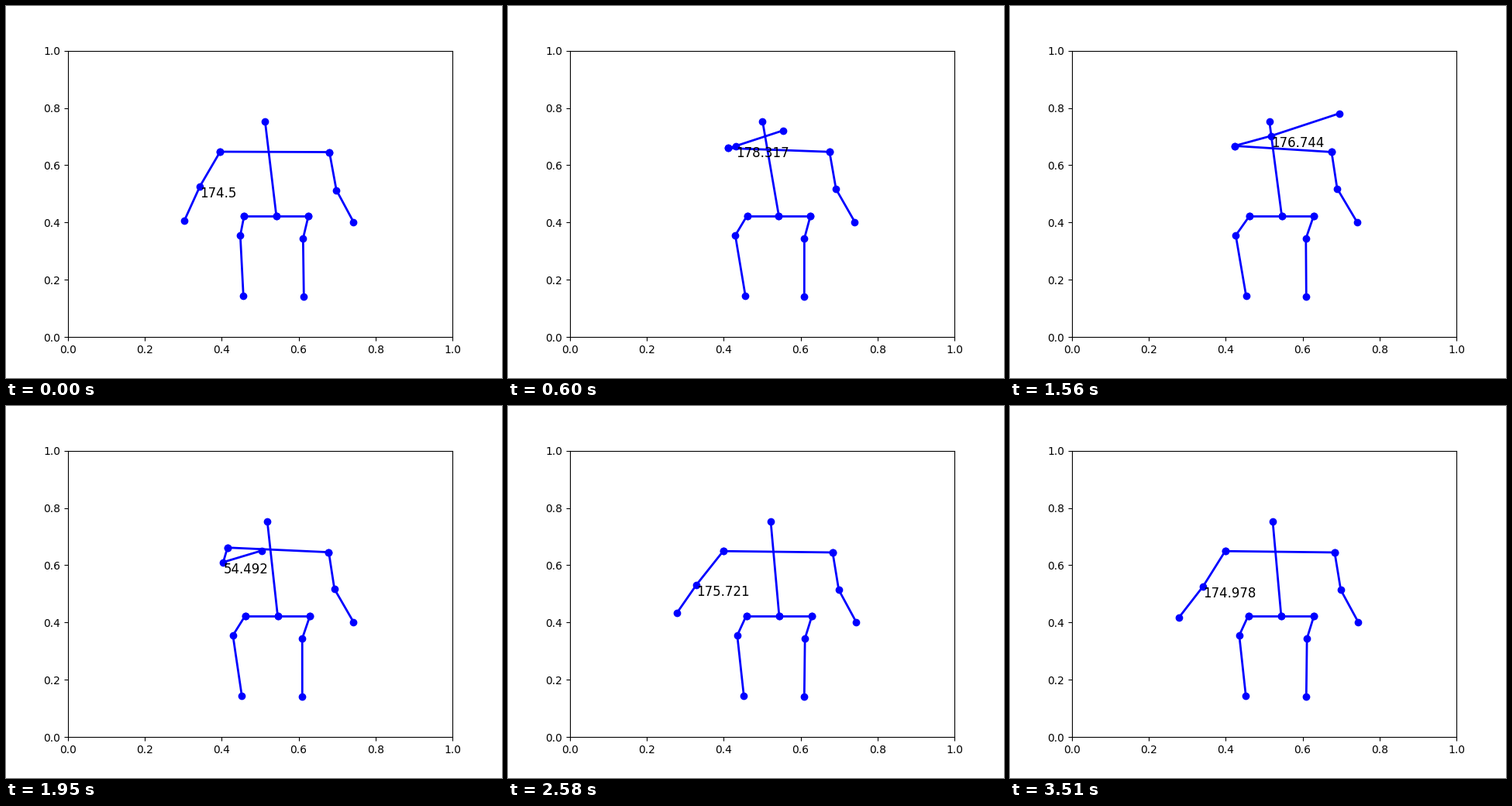
A matplotlib script that plays this animation: 640 px wide and 480 px high, repeating every 3540 ms.

```python
import numpy as np
import matplotlib.pyplot as plt
from matplotlib.animation import FuncAnimation

FRAMES, STEP = 118, 30

# Key poses of the moving arm: time in ms, elbow x y, wrist x y, angle shown.
# Positions are stage pixels, y downwards.
ARM = np.array([
    (0, 250, 233, 230, 277, 174.5),
    (390, 270, 208, 315, 205, 65.7),
    (600, 294, 181, 355, 161, 178.317),
    (990, 347, 161, 427, 131, 178.295),
    (1560, 337, 168, 425, 139, 176.744),
    (1950, 280, 202, 330, 187, 54.492),
    (2160, 256, 224, 254, 251, 157.6),
    (2580, 243, 231, 218, 267, 175.721),
    (3510, 249, 233, 218, 273, 174.978),
])


def key_slopes(times, values):
    """Harmonic mean slopes, so the curve never overshoots a key."""
    rise = np.diff(values, axis=0) / np.diff(times)[:, None]
    a, b = rise[:-1], rise[1:]
    same_way = a * b > 0
    slopes = np.zeros_like(values)
    slopes[1:-1] = np.where(same_way, 2 * a * b / np.where(same_way, a + b, 1), 0)
    return slopes


TIMES, POSES = ARM[:, 0], ARM[:, 1:]
SLOPES = key_slopes(TIMES, POSES)


def arm_pose(t):
    i = min(np.searchsorted(TIMES, t, side="right"), len(TIMES) - 1) - 1
    h = TIMES[i + 1] - TIMES[i]
    u = (t - TIMES[i]) / h
    return ((1 + 2 * u) * (1 - u) ** 2 * POSES[i]
            + u * (1 - u) ** 2 * h * SLOPES[i]
            + u * u * (3 - 2 * u) * POSES[i + 1]
            + u * u * (u - 1) * h * SLOPES[i + 1])


def ease(t, start, end):
    u = min(max((t - start) / (end - start), 0), 1)
    return u * u * (3 - 2 * u)


def pose(t):
    """Joint positions in pixels and the elbow angle in degrees."""
    lift = ease(t, 0, 1050) - 0.9 * ease(t, 1560, 2580)
    lean = ease(t, 0, 500)
    settle = ease(t, 900, 1800)
    elbow_x, elbow_y, wrist_x, wrist_y, angle = arm_pose(t)
    hip_y = 271
    l_hip_x = 307 + 2 * lift
    r_hip_x = 390 + 2 * settle
    joints = {
        "head": (334 - 4 * lean - 3 * lift + 9 * settle, 149.5),
        "l_shoulder": (276 + 13.5 * lift, 188.5 - 7.5 * lift),
        "r_shoulder": (417 - 4 * lift + 2 * settle, 189 - 0.5 * lift + 0.5 * settle),
        "l_elbow": (elbow_x, elbow_y),
        "l_wrist": (wrist_x, wrist_y),
        "r_elbow": (426 - 5 * lift + settle, 238 - 2 * lift),
        "r_wrist": (448 - 1.5 * lift + settle, 279),
        "l_hip": (l_hip_x, hip_y),
        "pelvis": ((l_hip_x + r_hip_x) / 2, hip_y),
        "r_hip": (r_hip_x, hip_y),
        "l_knee": (302 - 6 * lean - 5 * lift, 296.5),
        "l_ankle": (306 - 2 * settle, 374.5),
        "r_knee": (383 - 1.5 * lift, 300.5),
        "r_ankle": (384 - 2 * lean, 375),
    }
    return {name: to_axes(*p) for name, p in joints.items()}, angle


def to_axes(x, y):
    return (x - 79.7) / 496, (427.7 - y) / 369.6


CHAINS = [
    ("l_shoulder", "r_shoulder"),
    ("l_shoulder", "l_elbow", "l_wrist"),
    ("r_shoulder", "r_elbow", "r_wrist"),
    ("head", "pelvis"),
    ("l_hip", "pelvis", "r_hip"),
    ("l_hip", "l_knee", "l_ankle"),
    ("r_hip", "r_knee", "r_ankle"),
]

fig, ax = plt.subplots(figsize=(6.4, 4.8), dpi=100)
ax.set_xlim(0, 1)
ax.set_ylim(0, 1)
bones = [ax.plot([], [], "bo-", lw=2)[0] for _ in CHAINS]
label = ax.text(0, 0, "", fontsize=12)


def draw(frame):
    joints, angle = pose(frame * STEP)
    for bone, chain in zip(bones, CHAINS):
        bone.set_data(*zip(*(joints[name] for name in chain)))
    x, y = joints["l_elbow"]
    label.set_position((x, y - 0.04))
    label.set_text(str(round(float(angle), 3)))
    return bones + [label]


anim = FuncAnimation(fig, draw, frames=FRAMES, interval=STEP,
                     init_func=lambda: draw(0), repeat=True, repeat_delay=0)
plt.show()
```
